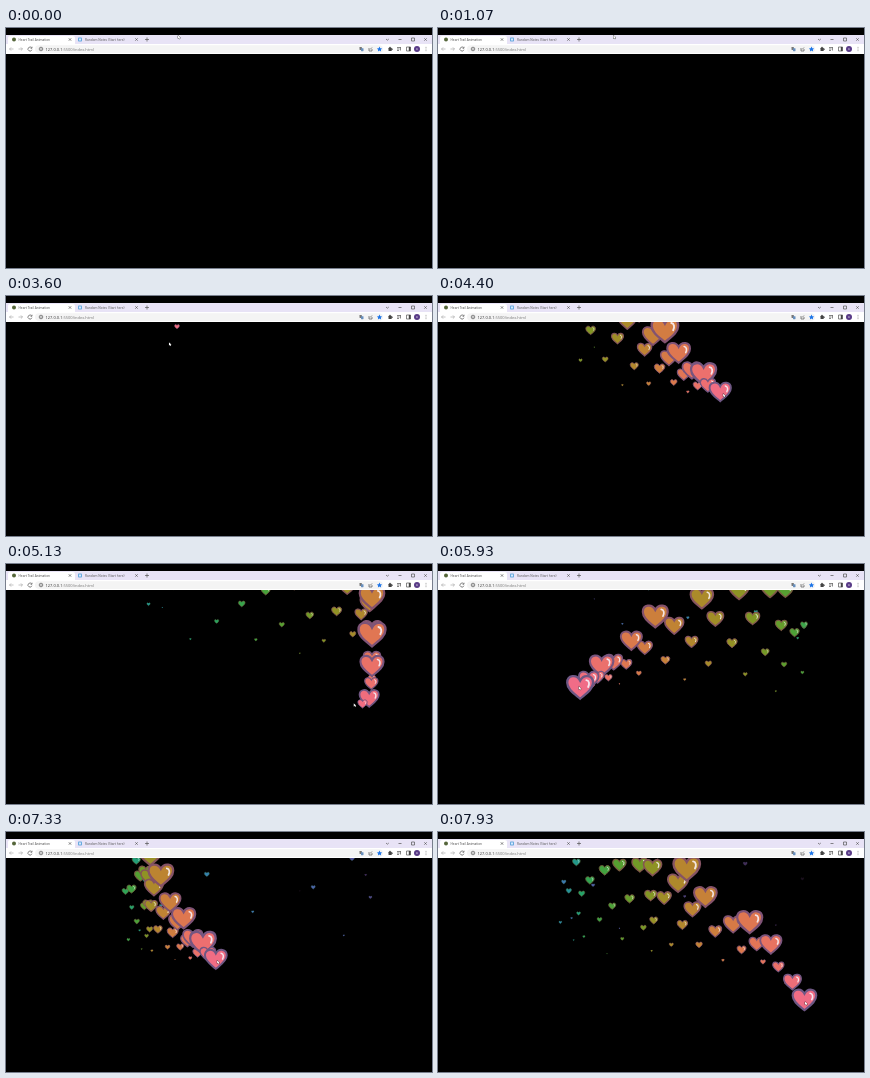
An HTML page with a canvas for the animation above (8000 ms loop, 426 by 240 pixels).

```html
<!DOCTYPE html>
<html lang="en">
<head>
<meta charset="utf-8">
<title>Heart Trail Animation</title>
<style>
  html, body { margin: 0; width: 100%; height: 100%; overflow: hidden; background: #000; }
  canvas { display: block; width: 100vw; height: 100vh; }
</style>
</head>
<body>
<canvas id="stage" width="426" height="240"></canvas>
<script>
const ctx = document.getElementById('stage').getContext('2d');
const LOOP = 8000, STEP = 1000 / 15;
const LIFE = 3, RISE = 9.5; // seconds, heart widths per second
const FIRST_HEART = 3570, MAX_SIZE = 27;

// Turning points of the pointer: time, x, y
const path = [
  [0, 173, 9], [2130, 180, 9], [FIRST_HEART, 171, 32], [3600, 164, 48], [3750, 139, 84],
  [4010, 199, 102], [4690, 351, 97], [4790, 366, 103], [5030, 366, 127], [5100, 363, 142],
  [5130, 349, 141], [5230, 343, 140], [5430, 289, 129], [5690, 198, 121], [5930, 142, 124],
  [6300, 119, 124], [6400, 123, 137], [6600, 138, 127], [6900, 146, 129], [7200, 187, 131],
  [7330, 212, 130], [7420, 216, 128], [7570, 254, 134], [7790, 331, 138], [7930, 368, 171],
  [LOOP, 368, 176]
];

function pointerAt(time) {
  const i = Math.max(1, path.findIndex(p => p[0] >= time));
  const [t0, x0, y0] = path[i - 1], [t1, x1, y1] = path[i];
  const k = (time - t0) / (t1 - t0);
  return { x: x0 + (x1 - x0) * k, y: y0 + (y1 - y0) * k };
}

let seed = 7;
const random = () => (seed = seed * 16807 % 2147483647) / 2147483647;

// The golden ratio spreads the sizes evenly along the trail
const hearts = [];
for (let born = FIRST_HEART; born < LOOP; born += 31 - 14 * random()) {
  const size = 1 + (MAX_SIZE - 1) * ((0.15 + hearts.length * 0.618034) % 1);
  hearts.push({ born, size, ...pointerAt(born) });
}

const heartShape = new Path2D(
  'M0 .45C-.2 .28-.5 .1-.5-.17C-.5-.46-.14-.52 0-.25C.14-.52 .5-.46 .5-.17C.5 .1 .2 .28 0 .45Z');
const heartShine = new Path2D('M.24-.27C.36-.25 .37-.11 .31 0');

function drawHeart({ born, size, x, y }, time) {
  const age = (time - born) / 1000;
  const top = y - RISE * size * age;
  if (age < 0 || age > LIFE || top < 26 - size) return;
  ctx.save();
  ctx.translate(x, top);
  ctx.scale(size, size);
  ctx.globalAlpha = 1 - (age / LIFE) ** 3;
  ctx.filter = `hue-rotate(${170 * age - 22 * age * age}deg)`;
  ctx.fillStyle = '#f06c88';
  ctx.fill(heartShape);
  ctx.lineWidth = 0.09;
  ctx.strokeStyle = '#6d5784';
  ctx.stroke(heartShape);
  if (size > 7) {
    ctx.lineCap = 'round';
    ctx.lineWidth = 0.07;
    ctx.strokeStyle = '#f4e4ee';
    ctx.stroke(heartShine);
  }
  ctx.restore();
}

function box(color, x, y, w, h, radius = 0) {
  ctx.fillStyle = color;
  ctx.beginPath();
  ctx.roundRect(x, y, w, h, radius);
  ctx.fill();
}

function line(d, color = '#555', width = 0.7) {
  ctx.strokeStyle = color;
  ctx.lineWidth = width;
  ctx.stroke(new Path2D(d));
}

function dot(color, x, y, r) {
  ctx.fillStyle = color;
  ctx.beginPath();
  ctx.arc(x, y, r, 0, 7);
  ctx.fill();
}

function label(text, x, y, size, color) {
  ctx.font = `${size}px "Open Sans", sans-serif`;
  ctx.fillStyle = color;
  ctx.fillText(text, x, y);
}

const cross = (x, y, r = 1.2) =>
  line(`M${x - r} ${y - r}l${2 * r} ${2 * r}m0 ${-2 * r}l${-2 * r} ${2 * r}`);

function drawBrowser() {
  box('#000', 0, 0, 426, 7);
  box('#e8e3f6', 0, 7, 426, 9);
  box('#fff', 2, 8, 67, 9, [2, 2, 0, 0]);
  box('#fff', 0, 16, 426, 10);

  // Tabs
  dot('#55663a', 8, 11.5, 2);
  label('Heart Trail Animation', 12.5, 12.9, 3.2, '#444');
  cross(64, 11.5);
  box('#68a9de', 72, 9.5, 4, 4, 0.8);
  box('#d4eaff', 73, 10.5, 2, 2);
  label('Random Notes (Start here)', 79, 12.9, 3.2, '#555');
  cross(130.5, 11.5);
  line('M139 11.5h4m-2-2v4');

  // Window buttons
  line('M380 11l1.4 1.2 1.4-1.2M392.5 11.5h3');
  line('M405.5 10h3v3h-3z');
  cross(419.5, 11.5);

  // Address row
  line('M7.5 21h-4l1.6-1.6M3.5 21l1.6 1.6', '#aaa');
  line('M12.5 21h4l-1.6-1.6M16.5 21l-1.6 1.6', '#aaa');
  line('M25.7 20a2 2 0 1 0 .2 1.7M26 18.7v1.5h-1.5');
  box('#f4f4f4', 29, 17.3, 348, 7.6, 3.8);
  line('M36.8 21a1.8 1.8 0 1 0-3.6 0a1.8 1.8 0 1 0 3.6 0M35 20.3v1.6');
  label('127.0.0.1', 39.5, 22.5, 4, '#333');
  const hostWidth = ctx.measureText('127.0.0.1').width;
  label(':5500/index.html', 39.5 + hostWidth, 22.5, 4, '#777');
  box('#777', 353.5, 19, 2.5, 3, 0.4);
  box('#678fbd', 355, 20.2, 2.5, 3, 0.4);
  line('M363 20v3h3v-2M364 21.5l2-2');
  ctx.fillStyle = '#1a73e8';
  ctx.fill(new Path2D('M373.5 18.5l.8 1.7 1.8.2-1.3 1.3.3 1.8-1.6-.9-1.6.9.3-1.8-1.3-1.3 1.8-.2z'));
  box('#444', 382.5, 19.8, 3.2, 3.2, 0.5);
  dot('#444', 384, 19.5, 0.8);
  dot('#444', 386, 21.3, 0.8);
  line('M391 19.5h4M391 21h2.5M391 22.5h2M394.5 19.5v3');
  line('M400.5 19h4v4h-4z');
  box('#444', 402.8, 19, 1.7, 4);
  dot('#593b87', 411, 21, 3);
  label('a', 410, 22.2, 3, '#fff');
  for (const y of [19.2, 21, 22.8]) dot('#555', 420, y, 0.45);
}

function drawPointer({ x, y }) {
  const arrow = new Path2D('M-1-1.5V1.5L-.2 .9 .4 2 1 1.7 .5 .7 1.4 .6Z');
  ctx.save();
  ctx.translate(x, y);
  ctx.lineWidth = 0.6;
  ctx.strokeStyle = '#222';
  ctx.stroke(arrow);
  ctx.fillStyle = '#fff';
  ctx.fill(arrow);
  ctx.restore();
}

function frame() {
  const now = performance.now() % LOOP;
  const time = Math.min(LOOP, Math.floor((now + 4) / STEP) * STEP);
  box('#000', 0, 0, 426, 240);
  for (const heart of hearts) drawHeart(heart, time);
  drawBrowser();
  drawPointer(pointerAt(time));
  requestAnimationFrame(frame);
}
frame();
</script>
</body>
</html>
```
